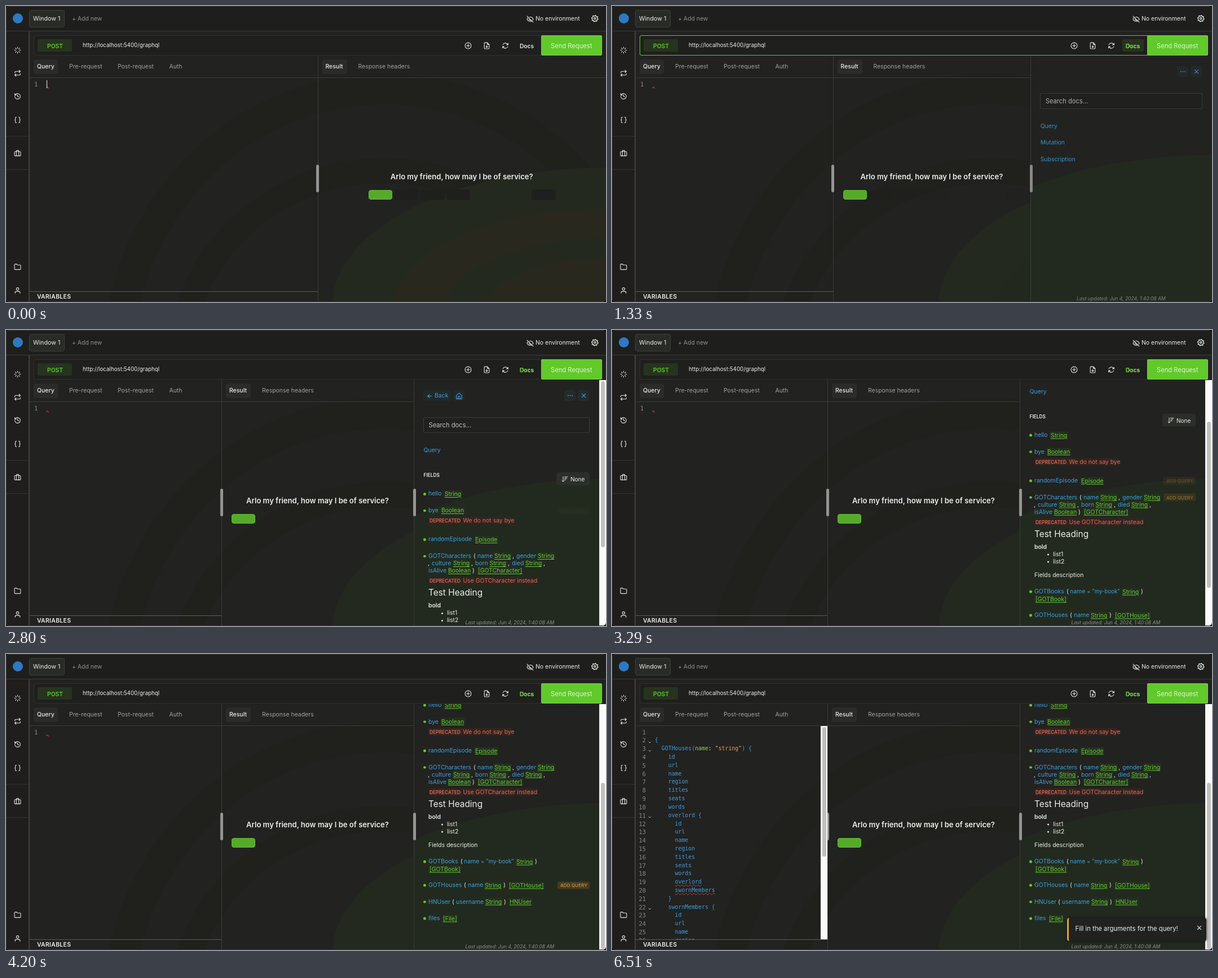
Animation, 1064 px wide and 526 px high, one loop 8000 ms. Source, as an HTML page:

```html
<!DOCTYPE html>
<html lang="en">
<head>
<meta charset="utf-8">
<title>API client</title>
<style>
html, body { margin: 0; width: 100%; height: 100%; overflow: hidden; background: #0c0c0c; }
#stage { position: relative; width: 1064px; height: 526px; overflow: hidden; background: #222221;
  font: 10.45px/20px Inter, sans-serif; color: #ececea; border-radius: 6px; }
#stage div, #stage svg, pre { position: absolute; box-sizing: border-box; margin: 0; white-space: pre; }
svg { fill: none; stroke-linecap: round; stroke-linejoin: round; overflow: visible; }
.dim { color: #a0a09d; }
.blue { color: #3c9fdd; }
.value { color: #3c9fdd; font-size: 9.7px; }
.semi { font-weight: 600; }
.type { color: #66c832; text-decoration: underline; text-underline-offset: 1.5px; line-height: 13px !important;
  margin: 3.5px -2px 0 !important; padding: 0 2px; background: #24301f; border-radius: 2px; }
.warn { color: #dd6a58; }
.tag { font-size: 8.4px; font-weight: 600; }
.grip { background: #949492; border-radius: 3px; }
.code { font: 9.85px/14.81px "DejaVu Sans Mono", monospace; color: #3c9fdd; }
.arg { color: #8fd84e; }
.str { color: #f0a050; }
.lint .err { text-decoration: underline wavy #d8392f .8px; text-underline-offset: 1px; }
</style>
</head>
<body>
<div id="stage"></div>
<script>
const stage = document.getElementById('stage');
const GREEN = '#61c92b', BLUE = '#3c9fdd', LINE = '#3b3b39';

// Builders
function box(parent, x, y, w, h, css = '', cls = '') {
  const el = document.createElement('div');
  el.className = cls;
  el.style.cssText = `left:${x}px;top:${y}px;width:${w}px;height:${h}px;${css}`;
  parent.append(el);
  return el;
}
function text(parent, x, y, str, cls = '', css = '') {
  const el = document.createElement('div');
  el.className = cls;
  el.textContent = str;
  el.style.cssText = `left:${x}px;top:${y - 10}px;${css}`;
  parent.append(el);
  return el;
}
function icon(parent, x, y, d, size = 13, color = '#e6e6e4', width = 2) {
  parent.insertAdjacentHTML('beforeend',
    `<svg viewBox="0 0 24 24" width="${size}" height="${size}" style="left:${x - size / 2}px;top:${y - size / 2}px"
      stroke="${color}" stroke-width="${width}"><path d="${d}"/></svg>`);
}
const fill = (c, r = 4) => `background:${c};border-radius:${r}px;`;
const oval = (parent, x, y, rx, ry, css) => box(parent, x - rx, y - ry, 2 * rx, 2 * ry, css + 'border-radius:50%;');

const CROSS = 'M5 5l14 14M19 5L5 19';
const DOTS = 'M4 12h.1M12 12h.1M20 12h.1';
const GEAR = 'M' + Array.from({ length: 32 }, (_, i) => {
  const a = (i + .5) * Math.PI / 16, r = i % 4 < 2 ? 11 : 8.3;
  return (12 + r * Math.cos(a)).toFixed(1) + ' ' + (12 + r * Math.sin(a)).toFixed(1);
}).join('L') + 'zM12 9a3 3 0 1 0 0 6 3 3 0 0 0 0-6';

// Backdrop
oval(stage, 670, 640, 500, 520, 'border:55px solid #20211d;');
oval(stage, 670, 640, 385, 370, 'border:45px solid #20211d;');
oval(stage, 1064, 530, 485, 243, 'background:#23291f;');
const glow = box(stage, 0, 0, 1064, 526);
oval(glow, 1064, 540, 380, 180, 'background:#28281f;');
oval(glow, 1064, 540, 285, 127, 'background:#23291f;');
oval(glow, 1064, 540, 215, 92, 'background:#28281f;');

// Result pane
const result = box(stage, 0, 0, 1064, 526);
box(result, 0, 88, 1, 438, `background:${LINE}`);
box(result, 8, 95, 44, 26, fill('#2b2b29'));
text(result, 14, 108, 'Result', '', 'font-weight:500');
text(result, 72, 108, 'Response headers', 'dim');
const greeting = text(stage, 0, 303, 'Arlo my friend, how may I be of service?', 'semi',
  'font-size:13.05px;transform:translateX(-50%)');
const bar = box(stage, 0, 327, 42, 17, fill('#55aa29') + 'border:1px solid #62bd33');
const ghosts = box(bar, -1, -1, 0, 0);
for (const x of [46, 92, 137, 289]) box(ghosts, x, -1, 43, 19, fill('#1f1f1e'));

// Editor pane
const editor = box(stage, 42, 89, 510, 437, 'overflow:hidden');
const edit = box(editor, -42, -89, 1064, 526);
box(edit, 49, 95, 43, 26, fill('#2b2b29'));
text(edit, 55, 108, 'Query', '', 'font-weight:500');
text(edit, 112, 108, 'Pre-request', 'dim');
text(edit, 198, 108, 'Post-request', 'dim');
text(edit, 289.5, 108, 'Auth', 'dim');
box(edit, 42, 507, 1000, 1, 'background:#5c5c5a');
text(edit, 55, 517, 'VARIABLES', 'semi', 'letter-spacing:.3px');

const empty = box(edit, 0, 0, 0, 0);
text(empty, 50, 139, '1', 'code', 'font-size:10.4px;line-height:20px;color:#8a8a88');
icon(empty, 73, 144, 'M3 15l7-6 11 10', 5, '#e0352c', 6);
const caret = box(empty, 71.5, 132, 1.3, 14, 'background:#f2f2f0');

const fields = pad => ['id', 'url', 'name', 'region', 'titles', 'seats', 'words'].map(f => pad + f);
const lines = [' ', '{', '  GOTHouses(name: "string") {', ...fields('    '), '    overlord {', ...fields('      '),
  '      overlord', '      swornMembers', '    }', '    swornMembers {', ...fields('      ').slice(0, 4)];
const query = box(edit, 0, 128, 382, 379, 'overflow:hidden');
const paint = s => s.replace('"string"', '<span class="str">$&</span>')
  .replace(/name:/, '<span class="arg">name</span><span style="color:#ddd">:</span>')
  .replace(/^( {6})(overlord|swornMembers)$/, '$1<span class="err">$2</span>');
query.insertAdjacentHTML('beforeend',
  `<pre class="code" style="left:76px;top:3.6px">${lines.map(paint).join('\n')}</pre>
   <pre class="code" style="right:322px;top:3.6px;font-size:10.4px;color:#8a8a88;text-align:right">${lines.map((_, i) => i + 1).join('\n')}</pre>`);
lines.forEach((s, i) => {
  if (s.endsWith('{')) icon(query, 67, 14 + i * 14.81, 'M4 8l8 8 8-8', 6, '#b0b0ae', 4);
});

const tabLine = box(stage, 42, 127, 900, 1, `background:${LINE}`);
const gripA = box(stage, 0, 282, 5, 49, '', 'grip');
const codeScroll = box(stage, 370, 128, 12, 379, 'background:#fafafa');
box(codeScroll, 3, 2, 7, 230, fill('#bfbfbd'));

// Docs panel
const panel = box(stage, 0, 89, 341, 437, 'background:#222221;overflow:hidden');
box(panel, 0, 0, 1040, 530, 'left:auto;right:-520px;top:176px;background:#222a1f;border-radius:50%');
box(panel, 0, 0, 1, 437, `background:${LINE}`);

function tools(parent, right) {
  for (const [r, d, w] of [[right + 17, DOTS, 4], [right - 7, CROSS, 2.4]]) {
    const b = box(parent, 0, 18, 20, 19, `left:auto;right:${r}px;` + fill('#252b2d'));
    icon(b, 10, 9.5, d, 11, BLUE, w);
  }
}
function search(parent, right) {
  const b = box(parent, 17, 66, 0, 28, `width:auto;right:${right}px;background:#21211f;border:1px solid ${LINE};border-radius:2px`);
  text(b, 8.5, 13, 'Search docs...', '', 'color:#c2c2c0;font-size:11.2px');
}
const home = box(panel, 0, 0, 0, 437, 'width:100%');
tools(home, 24.5);
search(home, 17);
['Query', 'Mutation', 'Subscription'].forEach((s, i) => text(home, 17.5, 125 + i * 29.3, s, 'blue'));

const docs = box(panel, 0, 0, 341, 437);
tools(docs, 37);
search(docs, 29);
const page = box(docs, -723, -89, 1064, 900);
box(page, 740, 107, 49, 19, fill('#22292a'));
icon(page, 751, 117, 'M20 12H4M11 19l-7-7 7-7', 11, BLUE, 2.4);
text(page, 760, 117, 'Back', 'blue');
box(page, 793, 107, 20, 19, fill('#22292a'));
icon(page, 803, 117, 'M3 10l9-8 9 8v11H3zM9 21v-8h6v8', 13, BLUE);
text(page, 740.5, 214, 'Query', 'blue');
text(page, 740.5, 258, 'FIELDS', 'tag');
box(page, 976, 253, 59, 23, fill('#2c2e29'));
icon(page, 991, 265, 'M6 3v18M2 17l4 4 4-4M11 4h11M11 9h8M11 14h5', 12);
text(page, 1001, 265, 'None', '', 'font-size:10px');

// "*" marks a type link, "=" a default value; punctuation stays white
function row(y, ...parts) {
  for (let i = 0; i < parts.length; i += 2) {
    const s = parts[i + 1];
    const cls = s[0] === '*' ? 'type' : s[0] === '=' ? 'value' : /^[(),]/.test(s) ? '' : 'blue';
    text(page, parts[i], y, s.replace('*', ''), cls);
  }
}
function field(y, ...parts) {
  box(page, 740, y - 2, 4.5, 4.5, fill(GREEN, 3));
  row(y, 749, ...parts);
}
function deprecated(y, w, why) {
  box(page, 749, y - 6.5, w, 13, fill('#33241f', 2));
  text(page, 751, y, 'DEPRECATED', 'tag warn');
  text(page, 810.5, y, why, 'warn');
}
field(291, 'hello', 778, '*String');
field(320.5, 'bye', 772, '*Boolean');
deprecated(338.5, 149, 'We do not say bye');
field(372, 'randomEpisode', 832, '*Episode');
field(401.5, 'GOTCharacters', 829, '(', 836, 'name', 866, '*String', 898, ',', 905, 'gender', 943, '*String');
row(414.5, 748, ',', 755, 'culture', 793, '*String', 825, ',', 832, 'born', 857.5, '*String', 890, ',',
  897, 'died', 921, '*String', 953, ',');
row(427.5, 749, 'isAlive', 784, '*Boolean', 827, ')', 837, '*[GOTCharacter]');
deprecated(445.5, 189, 'Use GOTCharacter instead');
text(page, 749, 467, 'Test Heading', '', 'font-size:15.4px');
text(page, 749, 490, 'bold', 'semi');
['list1', 'list2'].forEach((s, i) => {
  box(page, 772, 501.5 + i * 13, 3, 3, fill('#ececea', 2));
  text(page, 782, 503 + i * 13, s);
});
text(page, 749, 539.5, 'Fields description');
field(569, 'GOTBooks', 806, '(', 812, 'name', 842, '= "my-book"', 905, '*String', 938, ')');
row(582, 751, '*[GOTBook]');
field(611, 'GOTHouses', 812, '(', 819, 'name', 849, '*String', 882, ')', 892, '*[GOTHouse]');
field(640.5, 'HNUser', 791, '(', 798, 'username', 850, '*String', 883, ')', 893, '*HNUser');
field(670, 'files', 775, '*[File]');

// Row buttons: y, shown from, hidden from
const adds = [[320.5, 2785, 3010], [372, 3010, 3160], [401.5, 3160, 3990], [611, 3990, 5950]].map(([y, on, off]) => {
  const el = box(page, 978, y - 6.5, 57, 13, fill('#4a3b20', 2));
  text(el, 5, 6.5, 'ADD QUERY', '', 'font-size:8.2px;font-weight:500;color:#d29c42');
  return { el, on, off };
});
const track = box(docs, 329, 0, 12, 437, 'background:#fafafa');
const thumb = box(track, 3, 2, 7, 295, fill('#c0c0be'));
const updated = text(panel, 0, 431, 'Last updated: Jun 4, 2024, 1:40:08 AM', '', 'font-size:8.55px;font-style:italic;color:#8f8f8c');
const gripB = box(stage, 0, 282, 5, 49, '', 'grip');

const toast = box(stage, 807, 469, 247, 41, fill('#212120', 4) + 'border-left:3px solid #e3a041;box-shadow:0 0 4px #111');
text(toast, 11.5, 18.5, 'Fill in the arguments for the query!', '', 'font-size:11.25px');
icon(toast, 231.5, 17.5, CROSS, 11, '#f0f0ee', 2.4);

// Header, sidebar and address bar
box(stage, 0, 0, 1064, 45, `background:#1e1f1c;border-bottom:1px solid ${LINE}`);
box(stage, 12, 13, 18, 18, fill('#2f78c4', 9));
box(stage, 41, 7, 63, 31, fill('#292b27') + 'border:1px solid #3d3f3a');
text(stage, 48, 22.5, 'Window 1', '', 'font-size:10.7px');
text(stage, 117, 22.5, '+ Add new', '', 'color:#8f8f8c');
icon(stage, 929, 23, 'M10 5a10 10 0 0 1 12 7 14 14 0 0 1-2 3M6 6a14 14 0 0 0-4 6c2 5 6 7 10 7a10 10 0 0 0 6-2M9.5 9.5a3.5 3.5 0 0 0 5 5M2 2l20 20');
text(stage, 939, 22.5, 'No environment');
icon(stage, 1044, 22.5, GEAR, 12.5, '#f0f0ee', 2.3);

box(stage, 0, 45, 42, 481, 'background:#1f1e1d;border-right:2px solid #40403e');
for (const y of [231, 290]) box(stage, 0, y, 40, 1, 'background:#343432');
icon(stage, 20, 78, 'M12 2v4M12 18v4M5 5l3 3M16 16l3 3M2 12h4M18 12h4M5 19l3-3M16 8l3-3');
icon(stage, 20, 119, 'M17 2l4 4-4 4M3 11V9a3 3 0 0 1 3-3h15M7 22l-4-4 4-4M21 13v2a3 3 0 0 1-3 3H3');
icon(stage, 20, 160, 'M3 12a9 9 0 1 0 3-6.7L3 8M3 3v5h5M12 7v5l4 2');
icon(stage, 20, 202, 'M8 3H7a2 2 0 0 0-2 2v5a2 2 0 0 1-2 2 2 2 0 0 1 2 2v5a2 2 0 0 0 2 2h1M16 21h1a2 2 0 0 0 2-2v-5a2 2 0 0 1 2-2 2 2 0 0 1-2-2V5a2 2 0 0 0-2-2h-1');
icon(stage, 20, 261, 'M4 7h16a2 2 0 0 1 2 2v10a2 2 0 0 1-2 2H4a2 2 0 0 1-2-2V9a2 2 0 0 1 2-2zM8 21V5a2 2 0 0 1 2-2h4a2 2 0 0 1 2 2v16');
icon(stage, 20, 463, 'M22 19a2 2 0 0 1-2 2H4a2 2 0 0 1-2-2V5a2 2 0 0 1 2-2h5l2 3h9a2 2 0 0 1 2 2z');
icon(stage, 20, 505, 'M20 21v-2a4 4 0 0 0-4-4H8a4 4 0 0 0-4 4v2M12 3a4 4 0 1 0 0 8 4 4 0 0 0 0-8');

box(stage, 49, 52, 1008, 36, fill('#1f1f1d', 3) + 'border:1px solid #30302e');
const focus = box(stage, 49, 52, 1008, 36, `border:1px solid ${GREEN};border-radius:3px`);
box(stage, 56, 59, 61, 22, fill('#27331f', 3));
text(stage, 73, 71, 'POST', 'semi', `font-size:10.3px;color:${GREEN}`);
text(stage, 136, 69.5, 'http://localhost:5400/graphql', '', 'font-size:9.8px');
icon(stage, 819, 70, 'M12 2a10 10 0 1 0 0 20 10 10 0 0 0 0-20M12 7v10M7 12h10');
icon(stage, 852, 70, 'M14 2H6a2 2 0 0 0-2 2v16a2 2 0 0 0 2 2h12a2 2 0 0 0 2-2V8zM14 2v6h6M12 11v7M9 15l3 3 3-3');
icon(stage, 885, 70, 'M21 4v5h-5M3 20v-5h5M4 9a8.5 8.5 0 0 1 14-3l3 3M20 15a8.5 8.5 0 0 1-14 3l-3-3');
const docsHover = box(stage, 905, 59, 38, 22, fill('#27331f', 3));
text(stage, 911, 70.5, 'Docs', 'semi', 'font-size:10.2px');
const docsGreen = text(stage, 911, 70.5, 'Docs', 'semi', `font-size:10.2px;color:${GREEN}`);
box(stage, 949, 52, 108, 36, fill(GREEN, 2) + 'border:1px solid #72d240');
text(stage, 966, 70.5, 'Send Request', '', 'font-size:11.2px;color:#dcf6c9');
box(stage, 0, 0, 1064, 526, 'border:1px solid #383836;border-right:0;border-radius:6px');

// Motion
const ramp = (t, from, to) => Math.min(1, Math.max(0, (t - from) / (to - from)));
const show = (el, on) => { el.style.display = on ? '' : 'none'; };
const fade = (el, o) => { el.style.opacity = o; };
const left = (el, x) => { el.style.left = x + 'px'; };

function draw(t) {
  const open = 1 - (1 - ramp(t, 980, 1440)) ** 2;
  const edge = 1064 - 341 * open, mid = (41 + edge) / 2, centre = (mid + edge) / 2;

  editor.style.width = mid - 42 + 'px';
  tabLine.style.width = edge - 42 + 'px';
  left(result, mid);
  left(greeting, centre);
  left(bar, Math.max(centre - 165, mid + 18));
  left(gripA, mid - 2.5);
  left(gripB, edge - 1.5);
  left(panel, edge);
  panel.style.width = 1064 - edge + 'px';
  left(updated, Math.max(8, (1064 - edge) / 2 - 79));
  for (const el of [home, updated, gripB]) fade(el, open ** 2);
  fade(glow, 1 - ramp(t, 1050, 1400));
  fade(ghosts, 1 - open);

  const hover = ramp(t, 400, 740);
  fade(focus, hover * (1 - ramp(t, 2430, 2680)));
  fade(docsGreen, hover);
  fade(docsHover, hover * (1 - ramp(t, 1400, 1600)));
  show(caret, t < 140 || (t >= 740 && t < 980));

  const scroll = 200.5 * ramp(t, 2800, 3570) ** 1.45;
  show(home, t < 2450);
  show(docs, t >= 2450);
  for (const el of docs.children)
    if (el !== track) el.style.transform = `translateY(${-scroll}px)`;
  thumb.style.top = 2 + scroll * .687 + 'px';
  for (const a of adds) fade(a.el, ramp(t, a.on, a.on + 220) * (1 - ramp(t, a.off, a.off + 200)));

  const filled = t >= 5740;
  show(empty, !filled);
  show(query, filled);
  show(codeScroll, filled);
  query.classList.toggle('lint', t >= 6510);
  fade(toast, ramp(t, 5740, 6090));
}
function tick() {
  draw(performance.now() % 8000);
  requestAnimationFrame(tick);
}
tick();
</script>
</body>
</html>
```
